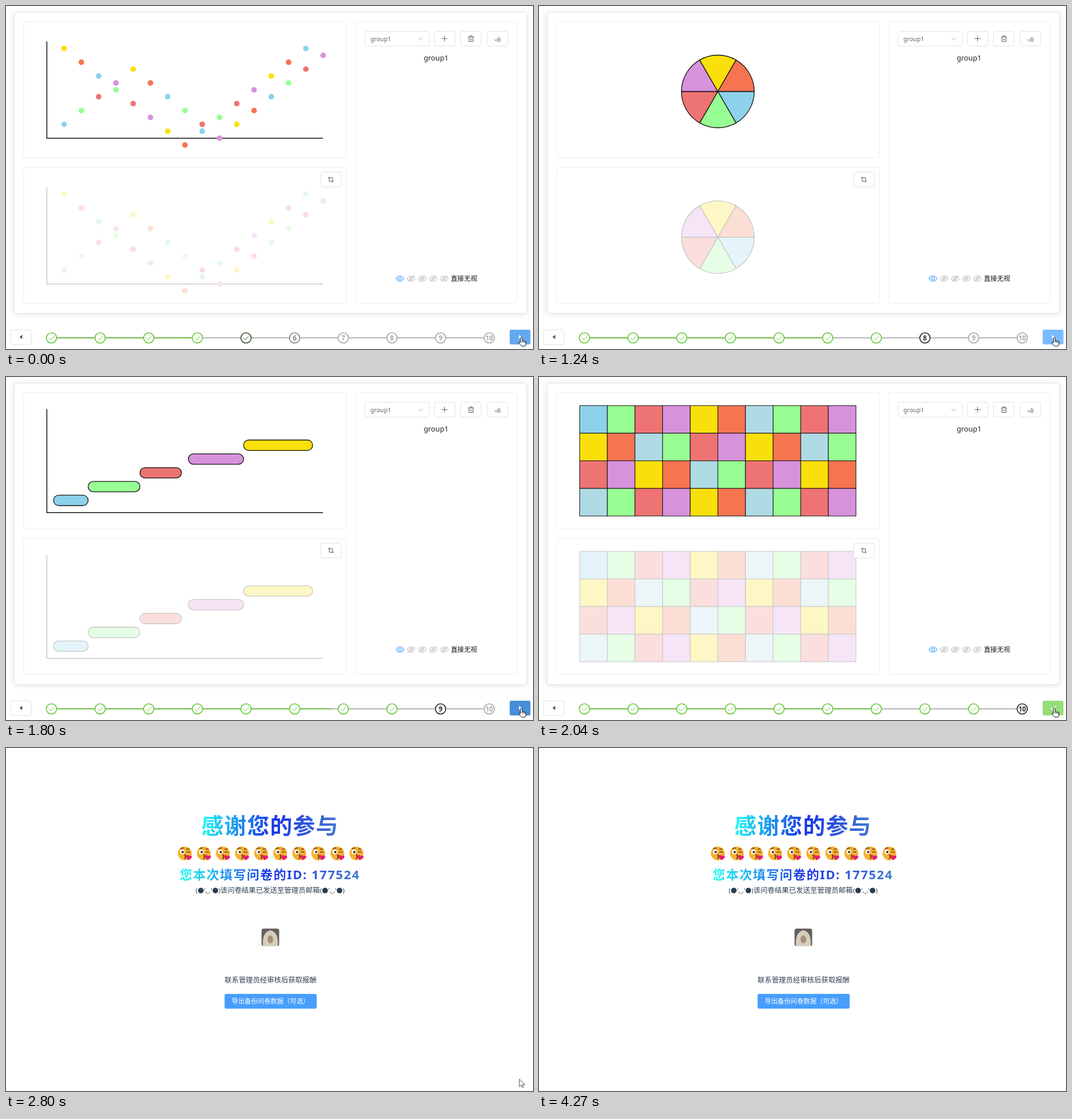
An HTML page that plays this animation: 927x604 px, repeating every 4300 ms.

```html
<!DOCTYPE html>
<html lang="zh">
<head>
<meta charset="utf-8">
<title>Survey</title>
<style>
  html, body { margin: 0; width: 100%; height: 100%; overflow: hidden; background: #fff; }
  svg { display: block; width: 927px; height: 604px; }
  text { font-family: "Noto Sans", "Noto Sans CJK SC", "DejaVu Sans", sans-serif; }
  .card { fill: #fff; stroke: #e6e8ee; filter: drop-shadow(0 1px 5px rgba(0, 0, 0, .13)); }
  .panel { fill: none; stroke: #ebeef5; }
  .btn { fill: #fff; stroke: #dfe2e8; }
  .icon { fill: none; stroke: #606266; stroke-width: 1; }
  .ink { fill: none; stroke: #111; stroke-width: 1.5; }
  .edge { stroke: #111; stroke-width: 1.3; }
  .num { font-weight: 700; font-size: 11.5px; text-anchor: middle; }
  .note { font-size: 12.45px; fill: #2c3e50; }
  .title { font-weight: 700; }
</style>
</head>
<body>
<svg id="stage" viewBox="0 0 927 604">
  <defs>
    <linearGradient id="big" gradientUnits="userSpaceOnUse" x1="344" y1="120" x2="584" y2="170">
      <stop offset="0" stop-color="#1ffff4"/><stop offset=".5" stop-color="#1b35e8"/><stop offset="1" stop-color="#437bd0"/>
    </linearGradient>
    <linearGradient id="small" gradientUnits="userSpaceOnUse" x1="306" y1="212" x2="624" y2="236">
      <stop offset="0" stop-color="#1ffff4"/><stop offset=".5" stop-color="#1b35e8"/><stop offset="1" stop-color="#437bd0"/>
    </linearGradient>
    <g id="kiss">
      <circle r="12.2" fill="#f9b032"/>
      <circle cx="-4.5" cy="-2.5" r="4" fill="#fff"/><circle cx="-3.8" cy="-2.3" r="2" fill="#3a2a20"/>
      <path d="M3 -1.5q3 -3 6 0M-8 -8q3 -2.5 6 -1M3 -7q3 -2 5 0" fill="none" stroke="#4a3020" stroke-width="1.4"/>
      <path d="M-1 2.5q4 .5 1.500 3q3 1.500 -1.500 4" fill="none" stroke="#4a2a20" stroke-width="1.6"/>
      <path d="M6 12C1.500 7 1.500 3 4.500 3Q6.500 3 7.500 5Q10 2.500 12 5Q14 8.500 6 12Z" fill="#ea1a6e"/>
    </g>
    <g id="eye" fill="none" stroke-width="1.1">
      <path d="M-7 0Q-4 -4.700 0 -4.700T7 0Q4 4.700 0 4.700T-7 0Z"/><circle r="2.5"/>
    </g>
  </defs>

  <g id="survey">
    <rect class="card" x="14.500" y="11.500" width="901" height="529.500" rx="3"/>
    <rect class="panel" x="31" y="27.500" width="567.500" height="240" rx="3"/>
    <rect class="panel" x="31" y="284.500" width="567.500" height="239" rx="3"/>
    <rect class="panel" x="615.500" y="27.500" width="283.500" height="496" rx="3"/>
    <g id="charts"></g>
    <g id="tools"></g>
    <path class="icon" d="M725.500 56l3.700 3.700l3.700 -3.700" style="stroke:#a8abb2"/>
    <path class="icon" d="M766.500 57.500h10M771.500 52.500v10"/>
    <path class="icon" d="M813 54.500h10M814.200 54.500v8h7.600v-8M816 54.500v-2h4v2M816.800 57v3.500M819.300 57v3.500"/>
    <path class="icon" d="M859 58.500l2.700 3l5.500 -7M866.500 57h3.500M865 59.500h5M863.500 62h6.500"/>
    <path class="icon" d="M566.500 302.500h8v8M568.500 300.500v8h8"/>
    <path d="M28.500 579v7.500l-4.800 -3.750z" fill="#505255"/>
    <text x="641" y="62" font-size="10.6" fill="#606266">group1</text>
    <text x="756.5" y="95.500" font-size="12.8" fill="#222" text-anchor="middle">group1</text>
    <g id="eyes"></g>
    <text x="782.500" y="484.300" font-size="11.6" fill="#111">直接无视</text>
    <g id="steps"></g>
    <rect id="next" x="886" y="570" width="36.500" height="26" rx="3"/>
    <path id="play" d="M902.500 579v7.500l4.800 -3.750z" fill="#fff"/>
    <path id="tick" d="M899.500 582.500l3.500 3.500l6.500 -7" fill="none" stroke="#fff" stroke-width="1.200"/>
  </g>

  <g id="thanks">
    <text class="title" x="343.500" y="150.500" font-size="39" letter-spacing="1.3" fill="url(#big)">感谢您的参与</text>
    <g id="faces"></g>
    <text class="title" x="305.500" y="230.500" font-size="22" letter-spacing="1.6" fill="url(#small)">您本次填写问卷的ID: 177524</text>
    <text class="note" x="377" y="254.800" style="font-size:12.5px">该问卷结果已发送至管理员邮箱</text>
    <text class="note" x="377" y="254.500" text-anchor="end" style="font-size:11px">(●'◡'●)</text>
    <text class="note" x="552.500" y="254.500" style="font-size:11px">(●'◡'●)</text>
    <rect x="449.500" y="318" width="31" height="31" rx="4" fill="#63605f"/>
    <path d="M452 349Q450 324 465 321Q480 324 478 349Z" fill="#d6cdbb"/>
    <ellipse cx="465" cy="337" rx="5" ry="7" fill="#a58f7c"/>
    <text class="note" x="384.500" y="412.700">联系管理员经审核后获取报酬</text>
    <rect x="384.500" y="433" width="162" height="26" rx="3" fill="#479efc"/>
    <text x="397" y="450.200" font-size="11.4" fill="#fff">导出备份问卷数据（可选）</text>
  </g>

  <path id="hand" transform="translate(906.500 583)" fill="#fff" stroke="#111" stroke-linejoin="round"
    d="M-1.500 9.500V1.200Q0 -.8 1.500 1.200V6.500Q3 5.300 4 7Q5.500 6 6.300 7.600Q7.800 7 8 9V12Q7.500 14 6.500 16H.5Q-1 13.500 -4.500 10.500Q-4.500 8 -1.500 9.500ZM1.500 6.500V9.500M4 7V9.500M6.300 7.600V10"/>
  <path id="arrow" fill="#fff" stroke="#333" stroke-width=".9" d="M0 0V13.500L3.200 10.600L5.300 15L7.300 14L5.300 9.800H9.500Z"/>
</svg>

<script>
const LOOP = 4300, FINISH = 2760;
const CLICKS = [-20, 445, 915, 1351, 1808];
const HUE = { B: '#8dd2ea', L: '#afdbe5', G: '#98fd92', R: '#ee7373', P: '#d792dc', Y: '#fae00b', O: '#f67450' };
const U = 6.075, X0 = 71.6;
const $ = id => document.getElementById(id);
const times = (n, f) => Array.from({ length: n }, (_, i) => f(i)).join('');
const axes = (top, bottom) => `<path class="ink" d="M71.800 ${top}V${bottom}H557.500"/>`;

function scatter() {
  const cols = 'Y0Bb O2G9 B4R7 P5G6 Y3R8 O5Pa B7Yc G9Oe RbBc GaPd R8Yb P6O9 Y4B7 O2G5 B0R3 P1'.split(' ');
  const dots = cols.map((col, i) => col.match(/../g).map(([hue, level]) =>
    `<circle cx="${102.2 + i * 5 * U}" cy="${74.7 + parseInt(level, 16) * 2 * U}" r="4.9" fill="${HUE[hue]}"/>`).join(''));
  return axes(62.5, 232.8) + dots.join('');
}

function boxes() {
  const half = [5, 6, 3, 4, 2, 6, 5, 2];
  return axes(62.5, 232.8) + times(8, i => {
    const x = 105.3 + i * 8 * U, y = 190.2, h = half[i] * U;
    return `<path class="edge" d="M${x} ${y - h - 2 * U}V${y + h + 2 * U}"/>
      <rect x="${x - 9.1}" y="${y - h}" width="18.2" height="${2 * h}" rx="6" fill="${HUE['LGRPYOBG'[i]]}"/>
      <path class="edge" d="M${x - 9.1} ${y}h18.2"/>`;
  });
}

function pie() {
  const r = 64, point = k => `${314.6 + r * Math.cos(k * Math.PI / 3)} ${150.5 + r * Math.sin(k * Math.PI / 3)}`;
  return times(6, k =>
    `<path class="edge" d="M314.6 150.5L${point(k)}A${r} ${r} 0 0 1 ${point(k + 1)}Z" fill="${HUE['BGRPYO'[k]]}"/>`);
}

function gantt() {
  const spans = [[2, 12], [12, 27], [27, 39], [41, 57], [57, 77]];
  return axes(56.5, 238.8) + spans.map(([a, b], i) =>
    `<rect class="edge" x="${X0 + a * U}" y="${208.2 - i * 4 * U}" width="${(b - a) * U}" height="18.3" rx="9" fill="${HUE['BGRPY'[i]]}"/>`).join('');
}

function grid() {
  const s = 8 * U;
  return times(40, i => `<rect class="edge" style="stroke-width:1" x="${X0 + i % 10 * s}" y="${50.4 + Math.floor(i / 10) * s}"
    width="${s}" height="${s}" fill="${HUE[i ? 'LGRPYO'[i % 6] : 'B']}"/>`);
}

$('charts').innerHTML = [scatter, boxes, pie, gantt, grid].map(draw => {
  const art = draw();
  return `<g>${art}<g transform="translate(0 256.6)" opacity=".23">${art}</g></g>`;
}).join('');

$('tools').innerHTML = [[631.5, 44.5, 113], [753.5, 44.5], [799.5, 44.5], [846.5, 44.5], [553.5, 292.5], [8, 570.3]]
  .map(([x, y, w = 36.3]) => `<rect class="btn" x="${x}" y="${y}" width="${w}" height="26" rx="3"/>`).join('');

$('eyes').innerHTML = times(5, i => `<g transform="translate(${693 + i * 19.5} 480)" stroke="${i ? '#c0c2c6' : '#409eff'}" stroke-width="1.1">
  <use href="#eye"/>${i ? '<path d="M-5.500 5L5.500 -5"/>' : ''}</g>`);

$('faces').innerHTML = times(10, i => `<use href="#kiss" x="${314.5 + i * 33.55}" y="185.6"/>`);

const stepX = i => 80 + i * 770 / 9;
$('steps').innerHTML = times(9, i => {
  const x = stepX(i) + 9.5;
  return `<path d="M${x} 584.4h66.500" stroke="#a6a7aa" stroke-width="1.6"/><path class="fill" stroke="#67c23a" stroke-width="1.6"/>`;
}) + times(10, i => `<g class="step" transform="translate(${stepX(i)} 584.5)">
  <circle r="9" fill="#fff" stroke="currentColor" stroke-width="1.7"/>
  <text class="num" y="4.300" fill="currentColor">${i + 1}</text>
  <path d="M-4.500 0l3.300 3.300l5.800 -6.300" fill="none" stroke="currentColor" stroke-width="1"/></g>`);

const charts = [...$('charts').children];
const fills = [...document.querySelectorAll('.fill')];
const steps = [...document.querySelectorAll('.step')];

const clamp = v => Math.max(0, Math.min(1, v));
const easeOut = u => 1 - (1 - u) ** 2;
const show = (el, on) => { el.style.display = on ? '' : 'none'; };
const mix = (a, b, u) => `rgb(${a.map((v, i) => Math.round(v + (b[i] - v) * u))})`;

const WAIT = [166, 167, 170], DARK = [40, 41, 43], DONE = [100, 203, 56];
const BLUE = [[121, 187, 255], [51, 126, 204]], GREEN = [[149, 221, 119], [82, 155, 46]];

// When step i becomes the active one
const activeAt = i => i < 5 ? CLICKS[0] - 460 * (5 - i) : i < 10 ? CLICKS[i - 5] : FINISH;

// Button darkening around a click: quick press, quick release
const press = (t, c) => .75 * (t < c ? easeOut(clamp((t - c + 70) / 70)) : 1 - easeOut(clamp((t - c) / 60)));

// Pointer stops: time, x, y
const PATH = [[2860, 903, 583], [3200, 594, 322], [3340, 571, 299.5], [3440, 571, 299.5], [3620, 592, 27]];
function pointer(t) {
  const k = PATH.findIndex(p => p[0] > t);
  if (k < 0) return PATH[PATH.length - 1].slice(1);
  if (k === 0) return PATH[0].slice(1);
  const [a, b] = [PATH[k - 1], PATH[k]];
  const u = (t - a[0]) / (b[0] - a[0]), e = u * u * (3 - 2 * u);
  return [1, 2].map(i => a[i] + (b[i] - a[i]) * e);
}

function render(t) {
  const over = t >= FINISH;
  show($('survey'), !over);
  show($('hand'), !over);
  show($('thanks'), over);
  show($('arrow'), over && t < 3650);
  if (over) {
    $('arrow').setAttribute('transform', `translate(${pointer(t)})`);
    return;
  }
  const stage = CLICKS.filter(c => c <= t).length - 1, last = stage === 4;
  charts.forEach((chart, i) => show(chart, i === stage));
  steps.forEach((step, i) => {
    const done = t >= activeAt(i + 1);
    const u = easeOut(clamp((t - activeAt(done ? i + 1 : i)) / 150));
    step.style.color = done ? mix(DARK, DONE, u) : mix(WAIT, DARK, u);
    show(step.children[1], !done);
    show(step.children[2], done);
  });
  fills.forEach((line, i) => {
    const u = clamp((t - activeAt(i + 2) - 150 * i) / 150) ** 2;
    line.setAttribute('d', `M${stepX(i) + 9.5} 584.4h${66.5 * u}`);
  });
  const shade = Math.max(...[...CLICKS, FINISH].map(c => press(t, c)));
  $('next').style.fill = mix(...(last ? GREEN : BLUE), shade);
  show($('play'), !last);
  show($('tick'), last);
}

function frame() {
  render(performance.now() % LOOP);
  requestAnimationFrame(frame);
}
frame();
</script>
</body>
</html>
```
